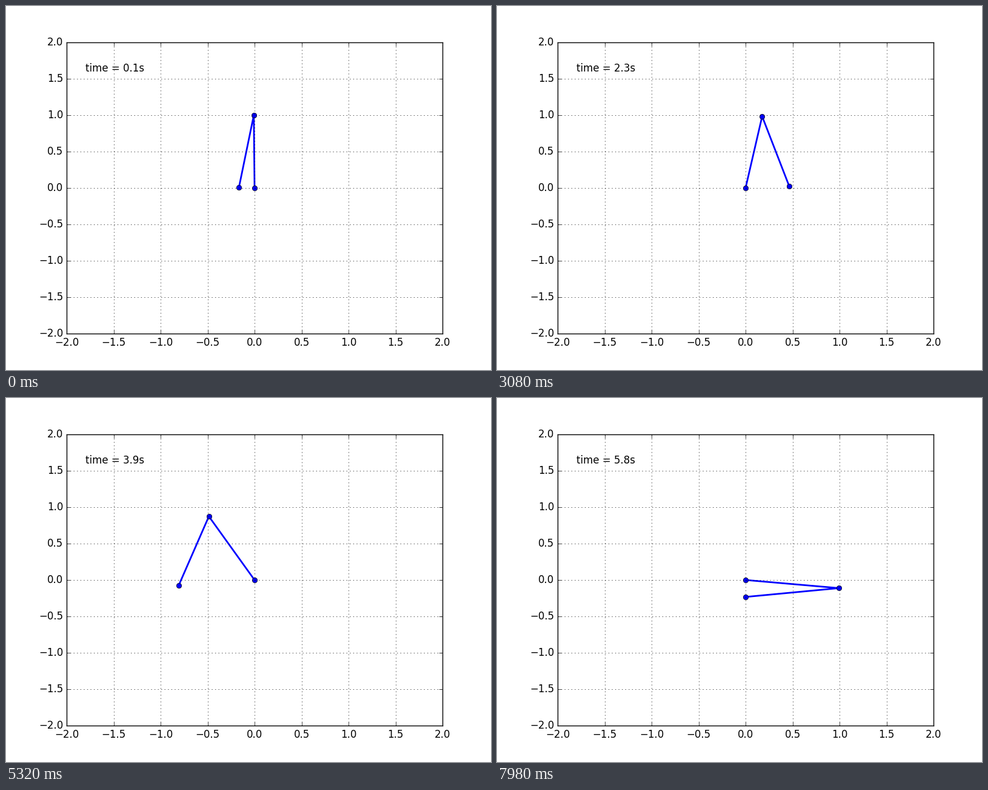
Write a matplotlib script that moves like this. It is 800 px wide and 600 px high and loops after 8 s.

```python
from math import cos, sin, pi, radians

import numpy as np
import matplotlib.pyplot as plt
from matplotlib.animation import FuncAnimation
from matplotlib.markers import TICKUP, TICKDOWN, TICKLEFT, TICKRIGHT

G = 9.8            # both arms are 1 m long, both bobs weigh 1 kg
DT = 0.1           # simulated seconds between poses
SUBSTEPS = 200
POSE_MS = 140
TICK_MS = 20
LOOP_MS = 8000
LIM = 2.0


def derivs(state):
    th1, w1, th2, w2 = state
    d = th2 - th1
    s, c = sin(d), cos(d)
    den = 2 - c * c
    a1 = (w1 * w1 * s * c + G * sin(th2) * c + w2 * w2 * s
          - 2 * G * sin(th1)) / den
    a2 = (-w2 * w2 * s * c + 2 * G * sin(th1) * c - 2 * w1 * w1 * s
          - 2 * G * sin(th2)) / den
    return w1, a1, w2, a2


def shift(state, slope, h):
    return [x + h * k for x, k in zip(state, slope)]


def rk4(state, h):
    k1 = derivs(state)
    k2 = derivs(shift(state, k1, h / 2))
    k3 = derivs(shift(state, k2, h / 2))
    k4 = derivs(shift(state, k3, h))
    return [x + h / 6 * (a + 2 * b + 2 * c + d)
            for x, a, b, c, d in zip(state, k1, k2, k3, k4)]


def simulate(count):
    """Joint positions after 1, 2, ... count steps of DT."""
    state = [pi, 0.0, radians(-10), 0.0]
    poses = []
    for _ in range(count):
        for _ in range(SUBSTEPS):
            state = rk4(state, DT / SUBSTEPS)
        th1, _, th2, _ = state
        x, y = sin(th1), -cos(th1)
        poses.append(([0, x, x + sin(th2)], [0, y, y - cos(th2)]))
    return poses


poses = simulate(-(-LOOP_MS // POSE_MS))

plt.style.use('classic')
plt.rcParams['font.family'] = 'DejaVu Sans'
fig = plt.figure(figsize=(8, 6), dpi=100, facecolor='white')
ax = fig.add_axes([0.125, 0.1, 0.775, 0.8], xlim=(-LIM, LIM),
                  ylim=(-LIM, LIM), xticks=[], yticks=[])

# Grid, ticks and labels as plain artists, which redraw faster than an axis.
ticks = np.linspace(-LIM, LIM, 9)
edge = np.full_like(ticks, LIM)
grid = dict(color='k', lw=0.5, ls=(0, (1, 3)), zorder=2.5)
for v in ticks[1:-1]:
    ax.axvline(v, **grid)
    ax.axhline(v, **grid)
for xs, ys, mark in [(ticks, -edge, TICKUP), (ticks, edge, TICKDOWN),
                     (-edge, ticks, TICKRIGHT), (edge, ticks, TICKLEFT)]:
    ax.plot(xs, ys, ls='none', marker=mark, ms=4, mew=0.5, color='k',
            clip_on=False, zorder=2.5)
ax.set(xlim=(-LIM, LIM), ylim=(-LIM, LIM))


def label(v, at, coords, offset, ha):
    ax.annotate(f'{v:.1f}'.replace('-', '\u2212'), at, xycoords=coords,
                xytext=offset, textcoords='offset pixels',
                ha=ha, va='baseline', annotation_clip=False)


for v in ticks:
    label(v, (v, 0), ('data', 'axes fraction'), (0, -20), 'center')
    label(v, (0, v), ('axes fraction', 'data'), (-5.6, -5), 'right')

arms, = ax.plot([], [], 'o-', color='b', lw=2)
clock = ax.text(0.05, 0.9, '', transform=ax.transAxes)


def update(i):
    n = i * TICK_MS // POSE_MS
    arms.set_data(*poses[n])
    clock.set_text(f'time = {(n + 1) * DT:.1f}s')
    return arms, clock


anim = FuncAnimation(fig, update, frames=LOOP_MS // TICK_MS,
                     init_func=lambda: update(0), interval=TICK_MS,
                     repeat=True, repeat_delay=0)
plt.show()
```
